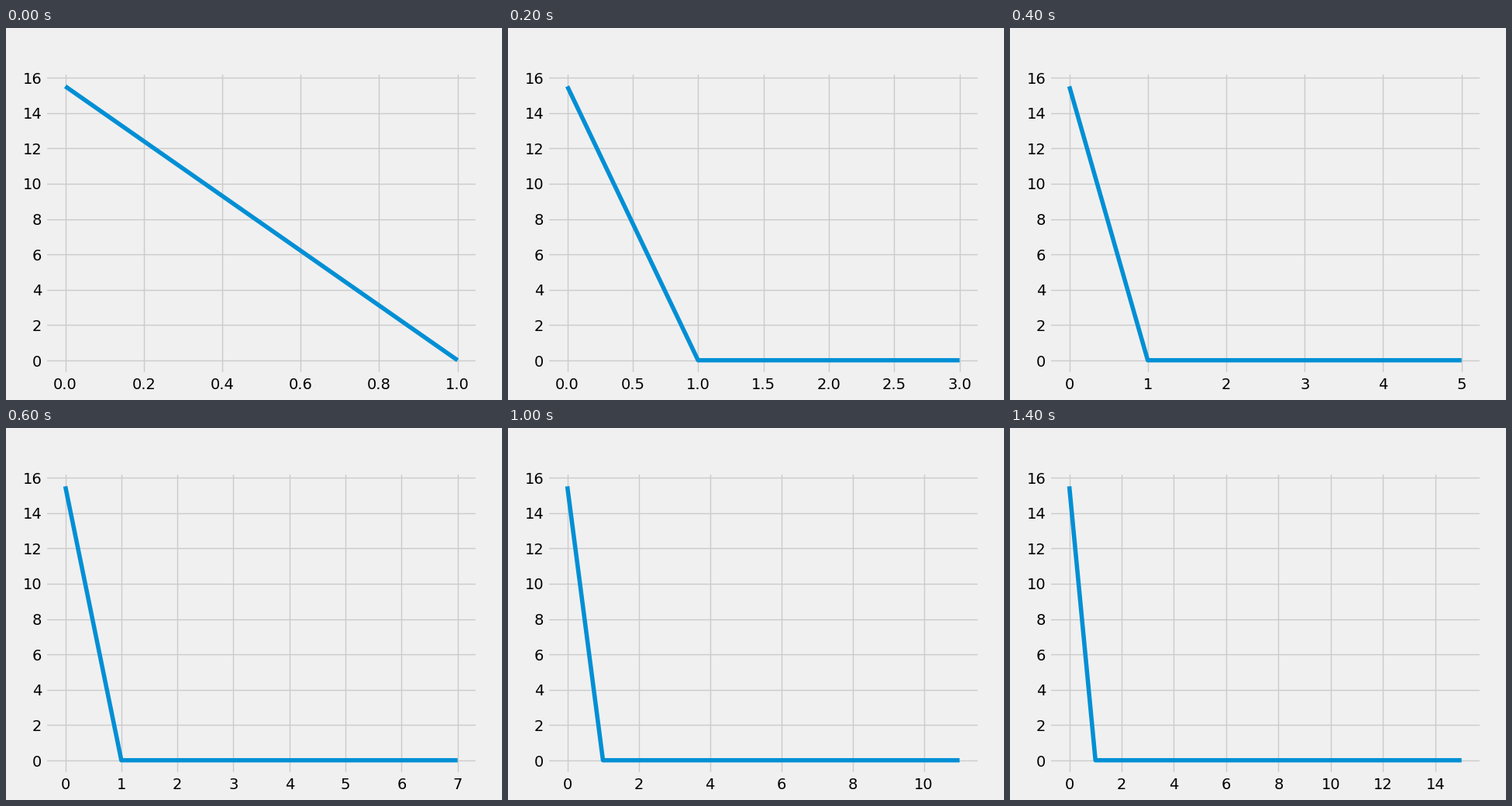
A matplotlib script for the animation above (1.5 s loop, 640 px wide and 480 px high).

```python
import matplotlib.pyplot as plt
import numpy as np
from matplotlib.animation import FuncAnimation

FRAMES = 15
START, FLOOR = 15.512, 0.012

plt.style.use("fivethirtyeight")
plt.rcParams["font.family"] = "DejaVu Sans"

fig, ax = plt.subplots(figsize=(6.4, 4.8), dpi=100)
fig.subplots_adjust(left=0.08, right=0.95, bottom=0.07, top=0.88)
line, = ax.plot([], [], color="#008fd5", linewidth=4)


def update(step):
    """Show the curve with one more point per step and refit the axes."""
    x = np.arange(step + 2)
    y = np.where(x == 0, START, FLOOR)
    line.set_data(x, y)
    ax.relim()
    ax.autoscale(True)
    ax.autoscale_view()
    return [line]


def reset():
    return update(0)


anim = FuncAnimation(fig, update, frames=FRAMES, init_func=reset,
                     interval=100, repeat=True, repeat_delay=0, blit=False)
plt.show()
```
